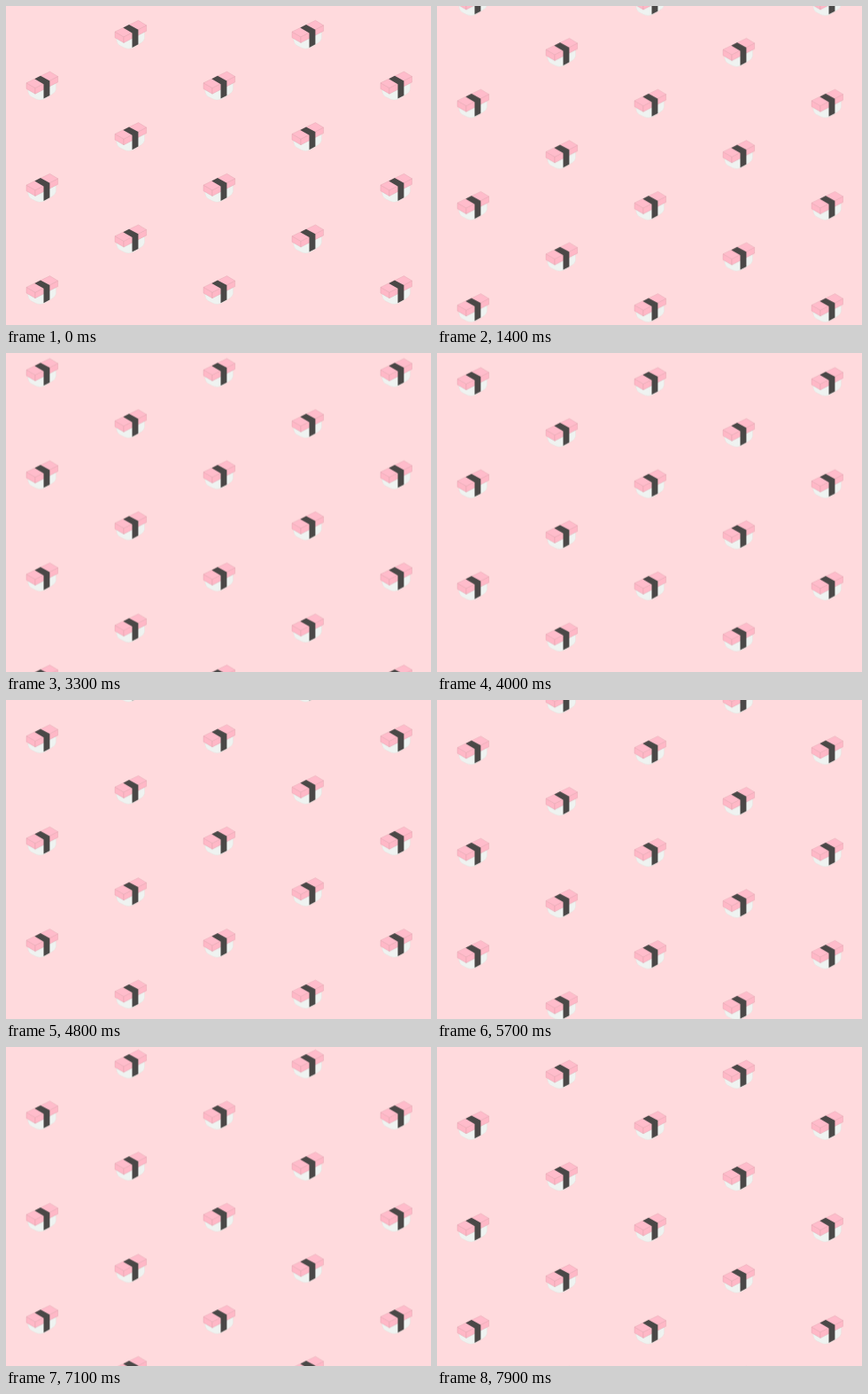
Recreate the animation shown at these times as an HTML page without scripts. Size 480 px wide and 360 px high, loop 8 s.

```html
<!DOCTYPE html>
<html lang="en">
<head>
<meta charset="utf-8">
<title>Sushi pattern</title>
<style>
  html, body { margin: 0; width: 100%; height: 100%; overflow: hidden; background: #ffdadd; }
  svg { display: block; width: 100%; height: 100%; }
  .scroll { animation: scroll 8s steps(80) infinite; }
  @keyframes scroll { to { transform: translateY(115.3px); } }
  .rice { fill: #eff3f1; stroke: #dcdcd6; stroke-width: .3; }
  .fish { stroke: #d9a0a8; stroke-width: .35; stroke-linejoin: round; }
  .top { fill: #ffbccb; }
  .side { fill: #ffb8c7; }
  .nori { fill: #4a4847; }
</style>
</head>
<body>
<svg viewBox="0 0 480 360">
  <defs>
    <g id="sushi">
      <path class="rice" d="M2.5 21 L11 24 L34.5 14 L34.5 21 Q34 24 31 26 L21 32 Q16 34 12 32 L6 29 Q3 27 2.5 21Z"/>
      <g class="fish">
        <path class="side" d="M1 13.8 L11 19.5 V26.2 L1 20.4Z"/>
        <path class="side" d="M11 19.5 L36.6 6.5 V13 L11 26.2Z"/>
        <path class="top" d="M1 13.8 L27.5 1 L36.6 6.5 L11 19.5Z"/>
      </g>
      <path class="nori" d="M10.3 9.3 L17 5.8 L27.4 11.4 V28 L20.5 31.6 V15.2Z"/>
    </g>
    <g id="tile">
      <use href="#sushi" x="22" y="73"/>
      <use href="#sushi" x="122" y="15.3"/>
    </g>
    <g id="row">
      <use href="#tile"/>
      <use href="#tile" x="200"/>
      <use href="#tile" x="400"/>
    </g>
  </defs>
  <g class="scroll">
    <use href="#row" y="-115.3"/>
    <use href="#row"/>
    <use href="#row" y="115.3"/>
    <use href="#row" y="230.6"/>
  </g>
</svg>
</body>
</html>
```
